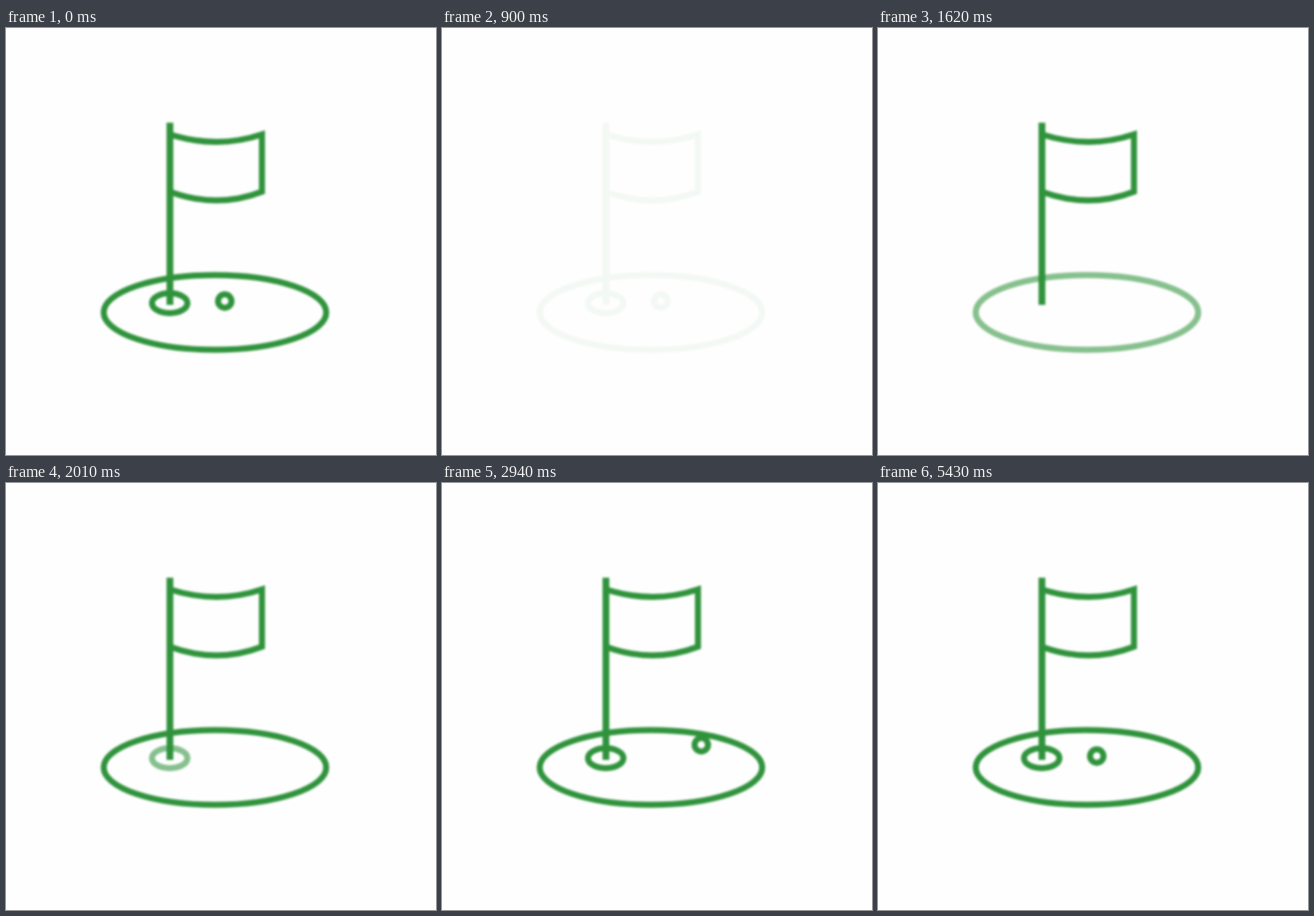
Write an HTML page that moves like this. It is 570 px wide and 566 px high and loops after 6.78 s.

```html
<!DOCTYPE html>
<html lang="en">
<head>
<meta charset="utf-8">
<title>Golf green</title>
<style>
html, body { margin: 0; width: 100%; height: 100%; overflow: hidden; background: #fefefe; }
svg { display: block; width: 100%; height: 100%; }
#scene { fill: none; stroke: #30933c; stroke-width: 8; filter: blur(1.5px); }
</style>
</head>
<body>
<svg viewBox="0 0 570 566">
  <g id="scene">
    <ellipse id="green" cx="277" cy="377" rx="147.5" ry="49.5"/>
    <ellipse id="hole" cx="217" cy="364.7" rx="23.5" ry="13.2"/>
    <g id="flag">
      <path d="M217 141Q280 161 339.3 141V217Q280 240 217 217"/>
      <path d="M217.3 125.5V367" stroke-width="9"/>
    </g>
    <circle id="ball" r="8.9"/>
  </g>
</svg>
<script>
const LOOP = 6780, STEP = 30;
const [scene, green, hole, flag, ball] =
  ['scene', 'green', 'hole', 'flag', 'ball'].map(id => document.getElementById(id));

const progress = (t, from, to) => Math.min(1, Math.max(0, (t - from) / (to - from)));
const mix = (a, b, p) => a + (b - a) * p;

function fadeIn(el, t, start) {
  el.style.opacity = t < 930 ? 1 : progress(t, start, start + 240) ** 1.9;
}

function ballAt(t) {
  if (t < 930 || t >= 3420) return [290, 362];
  if (t <= 2190) return [620, 94];
  if (t <= 2880) {
    // flies in, picking up speed
    const p = progress(t, 2190, 2880);
    return [mix(583, 358, p ** 1.7), mix(94, 364, p ** 2.45)];
  }
  // slowing hop to rest
  const s = 1 - (1 - progress(t, 2880, 3420)) ** 2;
  return [mix(358, 290, s), mix(364, 362, s) - 100 * s * (1 - s)];
}

function draw(now) {
  const t = Math.floor(now % LOOP / STEP) * STEP;
  scene.style.opacity = t < 930 ? (1 - progress(t, 660, 930)) ** 1.35 : 1;
  fadeIn(flag, t, 1050);
  fadeIn(green, t, 1440);
  fadeIn(hole, t, 1830);
  const [x, y] = ballAt(t);
  ball.setAttribute('cx', x);
  ball.setAttribute('cy', y);
}

const start = performance.now();
function tick() {
  draw(performance.now() - start);
  requestAnimationFrame(tick);
}
tick();
</script>
</body>
</html>
```
